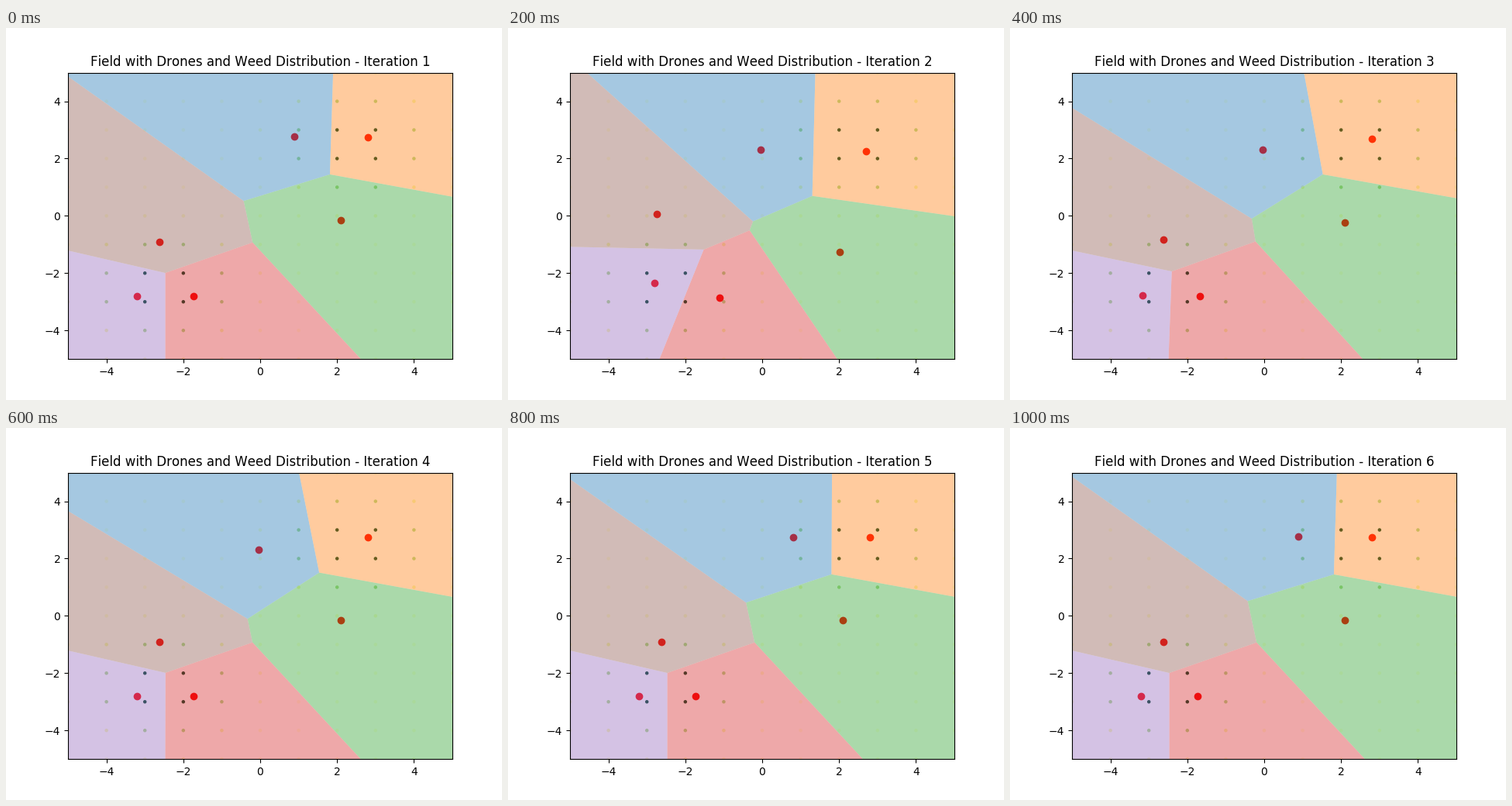
Write a matplotlib script that moves like this. It is 640 px wide and 480 px high and loops after 1200 ms.

```python
import numpy as np
import matplotlib.pyplot as plt
from matplotlib.animation import FuncAnimation

plt.rcParams["text.kerning_factor"] = 6

FRAMES = 6
HALF = 5        # the field spans -HALF..HALF on both axes
MARGIN = 20     # cells are clipped to a box well outside the field
REMAINDER = 0.08  # share of the way still left after each step

# Each drone glides from its start to its resting place.
start = np.array([(-.035, 2.305), (2.70, 2.255), (2.025, -1.27),
                  (-1.1, -2.855), (-2.8, -2.343), (-2.735, .058)])
rest = np.array([(.887, 2.78), (2.803, 2.735), (2.097, -.152),
                 (-1.734, -2.803), (-3.206, -2.803), (-2.621, -.909)])
delay = np.zeros((len(start), 1))
delay[0] = 2    # the first drone waits for the others to settle

weed_x, weed_y = np.meshgrid(np.arange(-HALF, HALF + 1),
                             np.arange(-HALF, HALF + 1))


def weed_patch(center):
    return np.exp(-((weed_x - center) ** 2 + (weed_y - center) ** 2) / 2)


weeds = weed_patch(2.5) + weed_patch(-2.5)


def drone_positions(i):
    """The loop opens on the settled field, then restarts the search."""
    step = (i - 1) % FRAMES
    left = REMAINDER ** np.maximum(step - delay, 0)
    return rest + left * (start - rest)


def clip(polygon, normal, offset):
    """Keep the part of a convex polygon where normal . p <= offset."""
    kept = []
    for a, b in zip(polygon, np.roll(polygon, -1, axis=0)):
        da, db = normal @ a - offset, normal @ b - offset
        if da <= 0:
            kept.append(a)
        if da * db < 0:
            kept.append(a + (b - a) * da / (da - db))
    return np.array(kept)


def voronoi_cell(points, index):
    cell = MARGIN * np.array([(-1, -1), (1, -1), (1, 1), (-1, 1)], float)
    own = points[index]
    for other in np.delete(points, index, axis=0):
        normal = other - own
        cell = clip(cell, normal, normal @ (own + other) / 2)
    return cell


fig, ax = plt.subplots(figsize=(6.4, 4.8), dpi=100)


def draw(i):
    drones = drone_positions(i)
    ax.clear()
    ax.scatter(weed_x, weed_y, c=weeds, cmap="YlGn", s=5)
    ax.scatter(*drones.T, c="red")
    # The translucent cells lie over the markers and tint them.
    for k in range(len(drones)):
        ax.fill(*voronoi_cell(drones, k).T, color=f"C{k}", alpha=0.4,
                linewidth=0)
    ax.set(xlim=(-HALF, HALF), ylim=(-HALF, HALF),
           xticks=range(-4, 5, 2), yticks=range(-4, 5, 2))
    ax.set_title(f"Field with Drones and Weed Distribution - Iteration {i + 1}")


anim = FuncAnimation(fig, draw, frames=FRAMES, interval=200,
                     init_func=lambda: None, repeat=True, repeat_delay=0)
plt.show()
```
